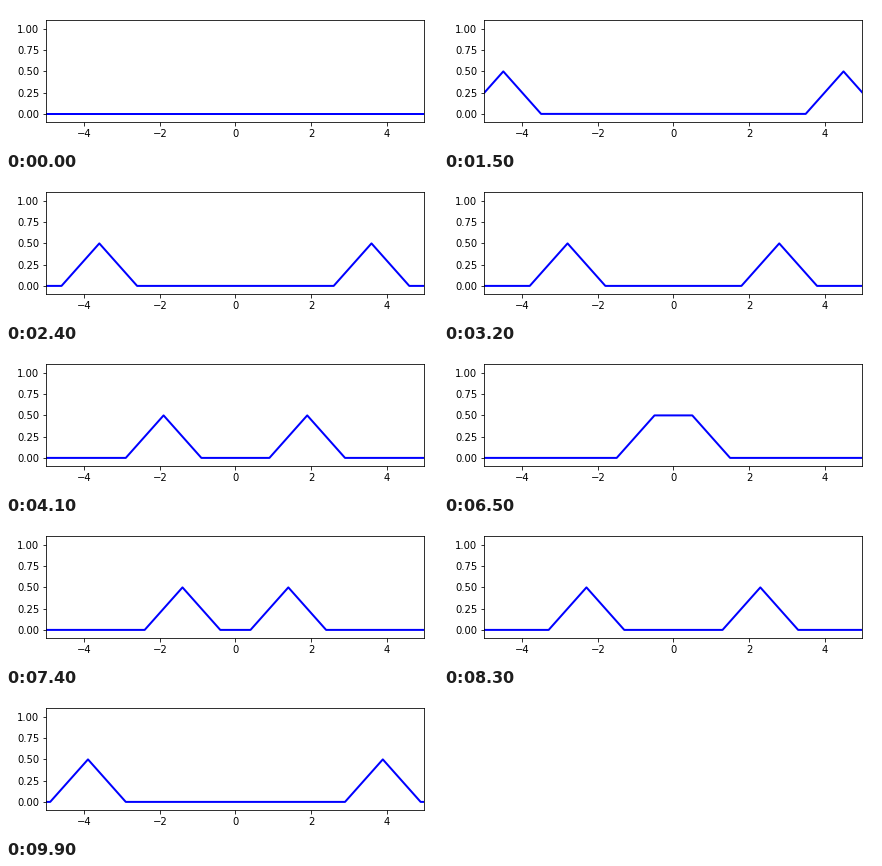
Recreate the animation shown at these times as a matplotlib script. Size 432 by 144 pixels, loop 10000 ms.

```python
import numpy as np
import matplotlib.pyplot as plt
from matplotlib.animation import FuncAnimation

W, H, DPI = 432, 144, 72
FRAMES, INTERVAL = 100, 100
START, SPEED = 6.0, 0.1  # pulse distance from the centre, step per frame

plt.rcParams["font.family"] = "DejaVu Sans"
plt.rcParams["font.size"] = 10

fig = plt.figure(figsize=(W / DPI, H / DPI), dpi=DPI, facecolor="white")
ax = fig.add_axes([40.4 / W, 1 - 116.4 / H, 378 / W, 102 / H])
ax.set_xlim(-5, 5)
ax.set_ylim(-0.1, 1.1)
ax.set_xticks(range(-4, 5, 2))
ax.set_yticks(np.linspace(0, 1, 5))

x = np.linspace(-5, 5, 1001)
line, = ax.plot(x, np.zeros_like(x), color="blue", lw=2)


def triangle(s):
    return 0.5 * np.clip(1 - np.abs(s), 0, None)


def update(i):
    c = START - SPEED * i
    line.set_ydata(triangle(x - c) + triangle(x + c))
    return line,


anim = FuncAnimation(fig, update, frames=FRAMES, interval=INTERVAL,
                     repeat=True, repeat_delay=0, blit=False)
plt.show()
```
